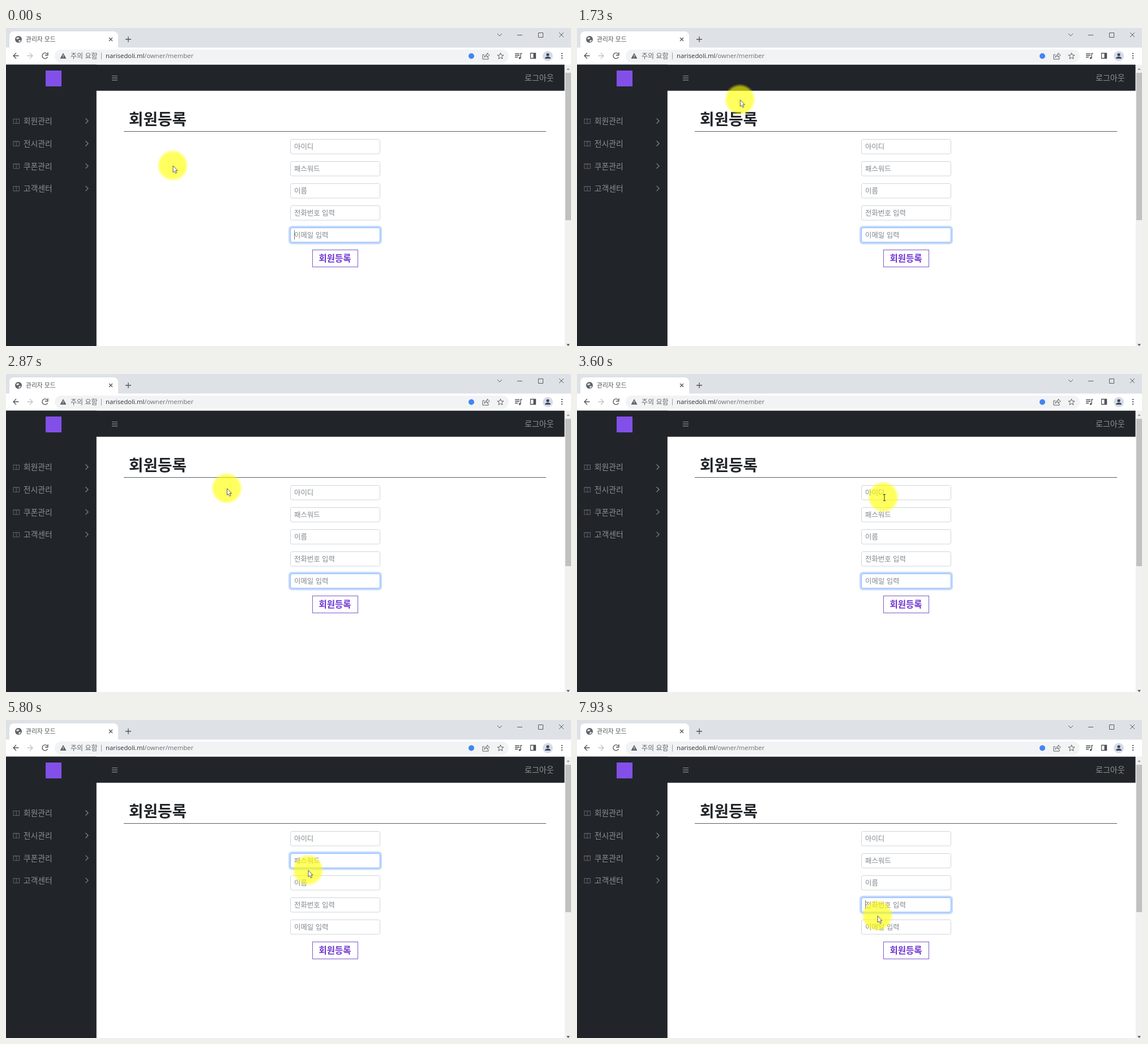
An HTML page for the animation above (8000 ms loop, 998 by 561 pixels).

```html
<!DOCTYPE html>
<html lang="ko">
<head>
<meta charset="utf-8">
<title>관리자 모드</title>
<style>
html, body { margin: 0; width: 100%; height: 100%; overflow: hidden; background: #fff; }
svg { display: block; width: 998px; height: 561px; }
text { font-family: "Noto Sans CJK KR", "Noto Sans CJK", sans-serif; white-space: pre; }
.latin { font-family: "Open Sans", "Noto Sans", sans-serif; }
.icon { fill: none; stroke: #505357; stroke-width: 1.3; }
.thin { fill: none; stroke: #4a4c50; stroke-width: .9; }
.pale { stroke: #c0c2c5; }
</style>
</head>
<body>
<svg viewBox="0 0 998 561">
  <defs>
    <radialGradient id="glow">
      <stop offset=".8" stop-color="#ff0" stop-opacity=".63"/>
      <stop offset="1" stop-color="#ff0" stop-opacity="0"/>
    </radialGradient>
    <filter id="shadow">
      <feDropShadow dx="0" dy="1" stdDeviation="1.4" flood-opacity=".3"/>
    </filter>
  </defs>

  <!-- browser window -->
  <rect width="998" height="65" fill="#fff"/>
  <rect width="998" height="34.5" fill="#dee1e6"/>
  <rect x="6" y="6" width="192" height="40" rx="8" fill="#fff"/>
  <circle cx="22" cy="20" r="6" fill="#5f6368"/>
  <path d="M18 18q3-3 5-1t-4 3zM22 22q4-2 4 0t-3 3z" fill="#dee1e6"/>
  <text x="35" y="23.5" font-size="10.8" fill="#505357">관리자 모드</text>
  <path class="icon" d="M182 17l6 6m0-6l-6 6M211 20h10m-5-5v10"/>
  <path class="thin" d="M868 10l4 4 4-4M903 12.500h9M940.500 8.500h8v8h-8zM977 8l8 8m0-8l-8 8"/>

  <path class="icon" d="M22.500 49H13m5-5l-5 5 5 5"/>
  <path class="icon pale" d="M37.500 49H47m-5-5l5 5-5 5"/>
  <path class="icon" d="M73 46A5 5 0 1 0 73.500 51M74 43v5h-5"/>
  <rect x="86" y="38" width="802" height="23" rx="11.5" fill="#f1f3f4"/>
  <path d="M101 44l5.500 10h-11z" fill="#5f6368"/>
  <path d="M101 47.500v3m0 1v1" stroke="#fff"/>
  <text x="114" y="53.5" font-size="12.05" fill="#64686d">주의 요함</text>
  <path d="M168.500 43.500v12" stroke="#9a9da1"/>
  <text class="latin" x="176" y="53.3" font-size="11.3" fill="#303236">narisedoli.ml<tspan fill="#6b6f74">/owner/member</tspan></text>
  <circle cx="822" cy="49.5" r="5" fill="#4285f4"/>
  <path class="thin" d="M845 47h-3v8h10v-3M845 52q0-5 5-5v-3l4 4-4 4v-3q-3 0-5 3z"/>
  <polygon id="star" class="thin"/>
  <path class="icon" d="M899 45.500h8m-8 3h8m-8 3h5M909 53v-8h2.500"/>
  <circle cx="907.5" cy="53" r="1.8" fill="#505357"/>
  <path class="icon" d="M926.500 44.500h9v9h-9z"/>
  <rect x="931.5" y="44.5" width="4" height="9" fill="#505357"/>
  <circle cx="957" cy="49.5" r="9" fill="#d5dbe8"/>
  <path d="M952 54q0-3.500 5-3.500t5 3.500z" fill="#3c4656"/>
  <circle cx="957" cy="47" r="2.6" fill="#3c4656"/>
  <path d="M982 44v10" stroke="#505357" stroke-width="2" stroke-dasharray="2"/>

  <!-- page frame -->
  <rect y="64.7" width="986.7" height="46" fill="#212529"/>
  <rect y="64.7" width="159.8" height="497" fill="#212529"/>
  <rect x="70" y="75" width="28" height="28" fill="#8250e8"/>
  <path d="M187 84.500h10m-10 3.700h10m-10 3.700h10" stroke="#8c8f92" stroke-width="1.2"/>
  <text x="916" y="92.6" font-size="14" fill="#909294">로그아웃</text>
  <g id="menu"></g>
  <rect x="986.7" y="64.7" width="12" height="497" fill="#f1f1f1"/>
  <rect x="988" y="79" width="10" height="260" fill="#c1c1c1"/>
  <path d="M990 74l3-3.500 3 3.500z" fill="#a3a3a3"/>
  <path d="M990 557.500l3 3.500 3-3.500z" fill="#505050"/>

  <!-- form -->
  <text x="217" y="171.3" font-size="27.7" font-weight="700" fill="#212529">회원등록</text>
  <path d="M208 182.500H954" stroke="#5a5c5f"/>
  <g id="form"></g>
  <rect x="541.5" y="391.5" width="80" height="30" fill="#fff" stroke="#7d5ac8"/>
  <text x="552.5" y="411.8" font-size="15.5" font-weight="700" fill="#6f35d3">회원등록</text>
  <path id="caret" d="M509.500 0v16" stroke="#777"/>

  <g id="popup">
    <g fill="#fff" filter="url(#shadow)">
      <rect x="563.5" y="228" width="78" height="98" rx="3"/>
      <path d="M577 228l4-4.500 4 4.500z"/>
    </g>
    <g id="hints" font-size="10.6" fill="#34383c"></g>
  </g>

  <g id="mouse">
    <circle r="28" fill="url(#glow)"/>
    <path id="arrow" d="M.5.500V12L3 10l2 4 2-1-2-4h3.500z" fill="#fff" stroke="#333" stroke-width=".8"/>
    <path id="beam" d="M0-4.500h4M2-4.500v11M0 6.500h4" stroke="#333"/>
  </g>
</svg>
<script>
const LOOP = 8000, STEP = 200 / 3, BLINK = 533;
const el = id => document.getElementById(id);
const show = (id, on) => { el(id).style.display = on ? '' : 'none'; };
const repeat = (id, items, markup) => { el(id).innerHTML = items.map(markup).join(''); };
const progress = (t, from, to) => Math.min(1, Math.max(0, (t - from) / (to - from)));
const easeOut = k => 1 - (1 - k) ** 1.25;

const fields = ['아이디', '패스워드', '이름', '전화번호 입력', '이메일 입력'];
const fieldTop = i => 196 + 39 * i;

el('star').setAttribute('points', Array.from({ length: 10 }, (_, i) => {
  const r = i % 2 ? 2.5 : 5.8, a = (i / 5 - .5) * Math.PI;
  return [873.5 + r * Math.cos(a), 49.7 + r * Math.sin(a)];
}).join(' '));

repeat('menu', ['회원관리', '전시관리', '쿠폰관리', '고객센터'], (label, i) => `
  <g transform="translate(0 ${164 + 39.7 * i})" fill="none" stroke="#606367">
    <path d="M13-3.500h10.500v8H13zM18.250-3v7.500M12.500-3.500h11.500"/>
    <text x="30.7" y="5.2" font-size="13.9" fill="#8c8f91" stroke="none">${label}</text>
    <path d="M140.500-4.500l4.500 4.500-4.500 4.500" stroke="#808386" stroke-width="1.3"/>
  </g>`);

repeat('form', fields, (label, i) => `
  <g transform="translate(0 ${fieldTop(i)})">
    <rect x="502.5" y=".5" width="158" height="25.5" rx="3" fill="#fff" stroke="#d0d5da"/>
    <g class="ring" fill="none">
      <rect x="500.5" y="-1.5" width="162" height="29.5" rx="4.5" stroke="#0d6efd" stroke-opacity=".25" stroke-width="3"/>
      <rect x="502.5" y=".5" width="158" height="25.5" rx="3" stroke="#86b7fe"/>
    </g>
    <text x="509" y="17.7" font-size="12.4" fill="#80868c">${label}</text>
  </g>`);
const rings = document.querySelectorAll('.ring');

repeat('hints', ['munel', 'lirt', 'bomasida'], (word, i) =>
  `<text class="latin" x="573" y="${251.5 + 29.8 * i}">${word}</text>`);

// start, end, x, y
const moves = [
  [0, 133, 306, 218],
  [2400, 2533, 313, 197],
  [2600, 2733, 323, 191],
  [2800, 3067, 545, 226],
  [3333, 3600, 541, 217],
  [4433, 4733, 535, 240],
  [5533, 5933, 533, 273],
  [6000, 6533, 533, 282],
  [6867, 7333, 531, 321],
  [7667, 7933, 530.5, 345]
];
const clicks = [4067, 5267, 6333, 7467];

// One turn around the heading, with a short change of pace at the top.
function circleHeading(t) {
  const a = 1.16 + 2.9 * progress(t, 667, 1533) + 3.24 * progress(t, 1533, 2400);
  return [282 + 60 * Math.cos(a), 174 + 48 * Math.sin(a)];
}

function positionAt(t) {
  let [x, y] = t < 667 ? [294.5, 242.5] : circleHeading(Math.min(t, 2400));
  for (const [from, to, endX, endY] of moves) {
    if (t >= 667 && to < 667) continue;
    const k = easeOut(progress(t, from, to));
    x += (endX - x) * k;
    y += (endY - y) * k;
  }
  return [x, y];
}

function draw(t) {
  const [x, y] = positionAt(t);
  const inField = x > 502 && fields.some((_, i) => y >= fieldTop(i) && y <= fieldTop(i) + 26);
  el('mouse').setAttribute('transform', `translate(${x} ${y})`);
  show('arrow', !inField);
  show('beam', inField);

  // The last field holds the focus until the first click.
  const last = fields.length - 1;
  const count = clicks.filter(time => time <= t + 1).length;
  const since = count ? clicks[count - 1] : -133;
  const focus = count ? count - 1 : last;
  const previous = count > 1 ? count - 2 : last;
  const fade = Math.min(1, (t - since + STEP) / 150);
  rings.forEach((ring, i) => {
    ring.style.opacity = i === focus ? fade : i === previous ? 1 - fade : 0;
  });

  show('caret', Math.floor((t - since + 2) / BLINK) % 2 === 0);
  el('caret').setAttribute('transform', `translate(0 ${fieldTop(focus) + 5})`);
  show('popup', focus === 0 && t > since + STEP / 2);
}

function tick() {
  const t = performance.now() % LOOP;
  draw(Math.min(119, Math.floor((t + 5) / STEP)) * STEP);
  requestAnimationFrame(tick);
}
tick();
</script>
</body>
</html>
```
